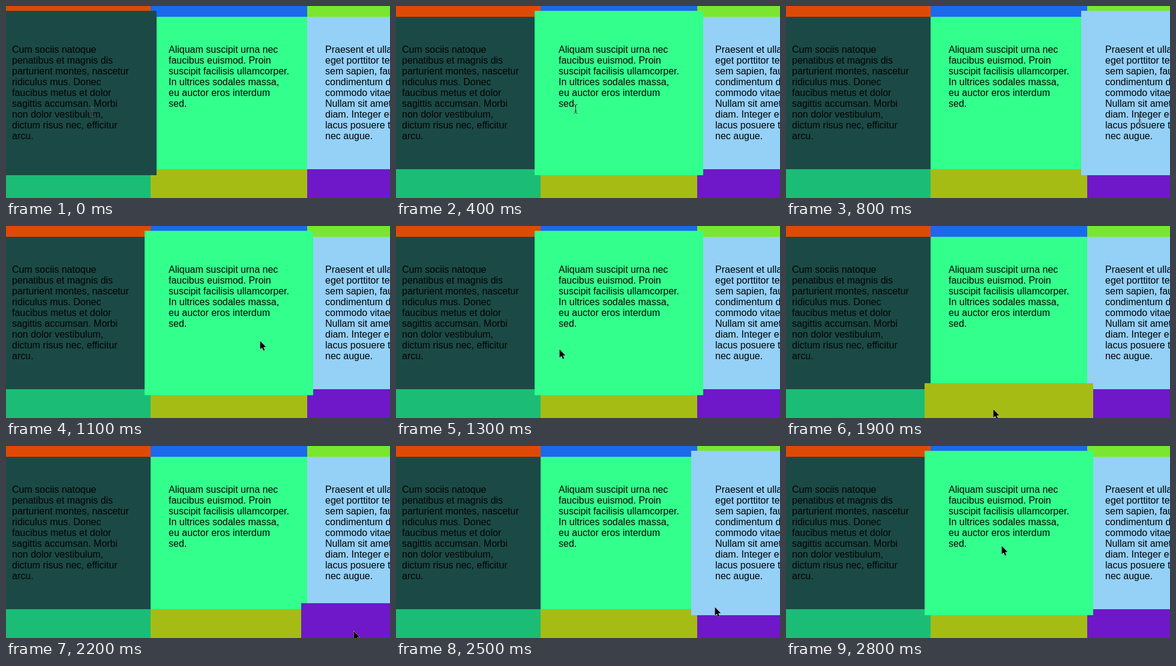
These frames come from a looping animation (640x320 px, 2900 ms). An HTML page:

```html
<!DOCTYPE html>
<html lang="en">
<head>
<meta charset="utf-8">
<title>Tiles growing under the pointer</title>
<style>
  html, body { margin: 0; width: 100%; height: 100%; overflow: hidden; }
  svg { display: block; width: 640px; height: 320px; cursor: default; }
  text { font: 16px "Liberation Sans", Arial, Helvetica, sans-serif; fill: #000; }
</style>
</head>
<body>
<svg id="stage" viewBox="0 0 640 320">
  <g id="tiles" shape-rendering="crispEdges"></g>
  <g id="copy"></g>
  <path id="arrow" d="M0 0V14L3.2 11L5.5 16.2L7.8 15.2L5.6 10.2H10Z"
        fill="#000" stroke="#fff" stroke-opacity=".75" stroke-width="1" paint-order="stroke"/>
  <g id="beam" fill="none">
    <path d="M-3 -7.5Q0 -7.5 0 -5.5Q0 -7.5 3 -7.5M0 -5.5V5.5M-3 7.5Q0 7.5 0 5.5Q0 7.5 3 7.5M-2 3.5H2"
          stroke="#fff" stroke-opacity=".35" stroke-width="2"/>
    <path d="M-3 -7.5Q0 -7.5 0 -5.5Q0 -7.5 3 -7.5M0 -5.5V5.5M-3 7.5Q0 7.5 0 5.5Q0 7.5 3 7.5M-2 3.5H2"
          stroke="#222" stroke-width="1"/>
  </g>
</svg>
<script>
const LOOP = 2900, STEP = 100;
const W = 261, H = 254, LEFT = -20, TOP = 18, GROW = 10;
const TEXT_TOP = 64, LINE = 18;
const COLORS = [
  '#de4a05', '#1d69ec', '#7ae62f',
  '#1b4a46', '#33ff8c', '#95d0f7',
  '#1bbd76', '#a5bc14', '#6e18c9'
];
const COPY = [
  ['Cum sociis natoque', 'penatibus et magnis dis', 'parturient montes, nascetur',
   'ridiculus mus. Donec', 'faucibus metus et dolor', 'sagittis accumsan. Morbi',
   'non dolor vestibulum,', 'dictum risus nec, efficitur', 'arcu.'],
  ['Aliquam suscipit urna nec', 'faucibus euismod. Proin', 'suscipit facilisis ullamcorper.',
   'In ultrices sodales massa,', 'eu auctor eros interdum', 'sed.'],
  ['Praesent et ullamcorper', 'eget porttitor tellus,', 'sem sapien, faucibus',
   'condimentum dolor,', 'commodo vitae', 'Nullam sit amet', 'diam. Integer eu',
   'lacus posuere tortor', 'nec augue.']
];
// pointer path: time, x, y
const PATH = [
  [0, 143, 176], [400, 299, 171.5], [600, 508, 180], [800, 589, 186],
  [900, 572, 190], [1300, 272, 205], [1600, 115, 299], [1800, 262, 304],
  [2200, 579, 308], [2400, 575, 296], [2800, 359, 166]
];

const $ = id => document.getElementById(id);

function add(parent, name, attrs) {
  const el = document.createElementNS('http://www.w3.org/2000/svg', name);
  for (const key in attrs) el.setAttribute(key, attrs[key]);
  return parent.appendChild(el);
}

const colX = col => LEFT + col * W;
const rowY = row => TOP + (row - 1) * H;

function tileRect(i, grow) {
  return {
    x: colX(i % 3) - grow, y: rowY(Math.floor(i / 3)) - grow,
    width: W + 2 * grow, height: H + 2 * grow, fill: COLORS[i]
  };
}

COLORS.forEach((_, i) => add($('tiles'), 'rect', tileRect(i, 0)));
const raised = add($('tiles'), 'rect', {});

const lines = COPY.map((list, col) => list.map((str, i) => {
  const el = add($('copy'), 'text', { x: colX(col) + 30, y: TEXT_TOP + 14 + i * LINE });
  el.textContent = str;
  return el;
}));

function slope(i, axis) {
  const a = PATH[Math.max(i - 1, 0)], b = PATH[Math.min(i + 1, PATH.length - 1)];
  return (b[axis] - a[axis]) / (b[0] - a[0]);
}

function pointer(t) {
  let i = 0;
  while (i < PATH.length - 2 && t >= PATH[i + 1][0]) i++;
  const a = PATH[i], b = PATH[i + 1], d = b[0] - a[0];
  const u = (t - a[0]) / d, v = 1 - u;
  return [1, 2].map(k =>
    v * v * (1 + 2 * u) * a[k] + u * u * (1 + 2 * v) * b[k] +
    u * v * d * (v * slope(i, k) - u * slope(i + 1, k)));
}

function overText(x, y, col) {
  const el = lines[col][Math.floor((y - TEXT_TOP) / LINE)];
  if (!el) return false;
  const dx = x - colX(col) - 30;
  return dx >= 0 && dx <= el.getComputedTextLength();
}

function draw(t) {
  const [x, y] = pointer(t);
  const col = Math.floor((x - LEFT) / W), row = Math.floor((y - TOP) / H) + 1;
  const rect = tileRect(row * 3 + col, GROW);
  for (const key in rect) raised.setAttribute(key, rect[key]);

  const isText = overText(x, y, col);
  $('beam').style.display = isText ? '' : 'none';
  $('arrow').style.display = isText ? 'none' : '';
  const px = Math.round(x) + 0.5, py = Math.floor(y) + 0.5;
  $(isText ? 'beam' : 'arrow').setAttribute('transform', `translate(${px} ${py})`);
}

const start = performance.now();
function tick() {
  const t = (performance.now() - start) % LOOP;
  draw(Math.floor(t / STEP) * STEP);
  requestAnimationFrame(tick);
}
tick();
</script>
</body>
</html>
```
